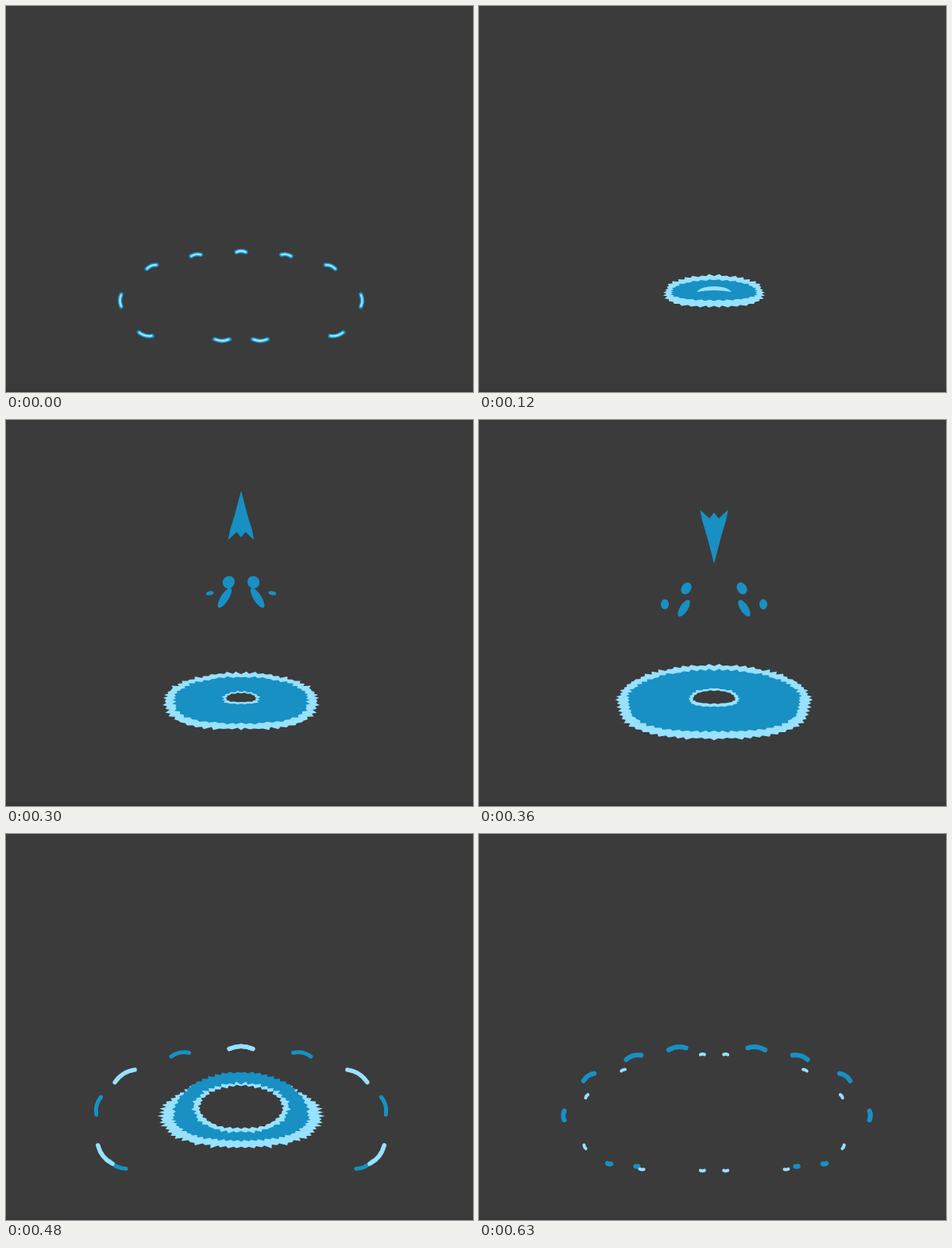
These frames come from a looping animation (588 px wide and 486 px high, 0.66 s). An HTML page:

```html
<!DOCTYPE html>
<html lang="en">
<head>
<meta charset="utf-8">
<title>Water splash</title>
<style>
html, body { margin: 0; width: 100%; height: 100%; overflow: hidden; background: #3b3b3b; }
svg { display: block; }
</style>
</head>
<body>
<svg width="588" height="486" viewBox="0 0 588 486">
  <defs>
    <clipPath id="crop"><rect width="588" height="426.5"/></clipPath>
    <filter id="soft" filterUnits="userSpaceOnUse" width="588" height="486" color-interpolation-filters="sRGB">
      <feGaussianBlur stdDeviation=".55"/>
    </filter>
  </defs>
  <rect width="588" height="486" fill="#3b3b3b"/>
  <rect y="482" width="588" height="4" fill="#373737"/>
  <g id="splash" clip-path="url(#crop)" filter="url(#soft)"></g>
</svg>
<script>
const CX = 296, STEP = 30, STEPS = 22;
const BG = '#3b3b3b', BLUE = '#1890c3', LIGHT = '#98e1ff';
const FILLS = [LIGHT, BLUE, LIGHT, BG];
const stage = document.getElementById('splash');

// Ring poses: squareness of the lower half, waviness of the rim,
// then layers of [radius, middle y, height above, height below].
const PUDDLE = [3, 0, [[61, 359, 20, 19], [53, 359, 14, 11]]];
const SEED = [3, 0, [[32, 350, 8, 10], [24, 350, 6, 7], [0, 350, 0, 0], [0, 350, 0, 0]]];
const DISC = [2.9, 0, [[120, 351, 42, 50], [108, 351, 36, 41], [31, 351, 13, 10], [26, 350, 9, 7]]];
const WIDE = [4, .035, [[162, 354, 68, 65], [154, 354, 66, 60], [137, 354, 50, 49], [95, 353, 34, 35]]];
const SECOND = [2, 0, [[128, 357, 60, 52], [110, 355, 73, 43], [84, 342, 43, 43], [74, 341, 37, 37]]];

const rad = deg => deg * Math.PI / 180;
const noise = k => Math.abs(Math.sin(k * 12.9898) * 43758.5453) % 1;
const mix = (a, b, t) => Array.isArray(a) ? a.map((v, i) => mix(v, b[i], t)) : a + (b - a) * t;
const grow = ([n, wave, layers], ...ks) => [n, wave, layers.map(([rx, cy, up, down], i) => {
  const k = ks[i] || ks[0];
  return [rx * k, cy, up * k, down * k];
})];

// Left side of an oval; turn runs from the top (0) to the bottom (PI).
function rim([rx, cy, up, down], n, turn, wave = 0) {
  const s = Math.abs(Math.sin(turn)), c = Math.cos(turn), p = c > 0 ? 2 : n;
  const r = (1 - wave * Math.cos(6 * turn)) / (s ** p + Math.abs(c) ** p) ** (1 / p);
  return [-rx * s * r, cy - (c > 0 ? up : down) * c * r];
}

function closed(half, fill) {
  const right = half.slice(1, -1).reverse().map(([x, y]) => [-x, y]);
  const d = half.concat(right).map(([x, y]) => (CX + x).toFixed(1) + ' ' + y.toFixed(1));
  return `<path d="M${d.join('L')}Z" fill="${fill}"/>`;
}

// Oval with irregular teeth that lean sideways, largest at the flanks.
function ragged(layer, n, wave, teeth, fill) {
  const count = Math.round((layer[0] + layer[2]) * .4) + 4, half = [];
  for (let i = 0; i <= count; i++) {
    const turn = Math.PI * i / count, [x, y] = rim(layer, n, turn, wave);
    const size = teeth * (i % 2 ? noise(i + layer[0]) : -.6 * noise(i + layer[2]));
    const lean = i % count ? size * (.3 + .7 * Math.sin(turn)) : 0;
    half.push([Math.min(0, x - lean), y - size * .5 * Math.cos(turn)]);
  }
  return closed(half, fill);
}

function ring([n, wave, layers], ...teeth) {
  return layers.map((layer, i) => ragged(layer, n, i ? 0 : wave, teeth[i] || teeth[0], FILLS[i])).join('');
}

function mirrored(s, axis = CX) {
  return s + `<g transform="translate(${2 * axis}) scale(-1 1)">${s}</g>`;
}

// Short curved strokes lying along an oval, at the given angles from its top.
function bits(oval, angles, fill, len, wide, axis = CX) {
  return mirrored(angles.map(deg => {
    const at = d => rim(oval, 4, rad(d)), [x, y] = at(deg);
    const a = at(deg + 1), b = at(deg - 1), tilt = Math.atan2(b[1] - a[1], b[0] - a[0]) / rad(1);
    const l = Math.max(1, (typeof len === 'function' ? len(deg) : len) - wide) / 2;
    return `<path transform="translate(${axis + x} ${y}) rotate(${deg ? tilt : 0})" ` +
      `d="M${-l} ${l * .15}Q0 ${-l * .3} ${l} ${l * .15}" fill="none" stroke="${fill}" ` +
      `stroke-width="${wide}" stroke-linecap="round"/>`;
  }).join(''), axis);
}

function blob(x, y, rx, ry, fill, turn = 0) {
  return `<ellipse transform="translate(${CX + x} ${y}) rotate(${turn})" rx="${rx}" ry="${ry}" fill="${fill}"/>`;
}

function crescent(w, top, drop, thick, fill) {
  const low = top + drop, inner = top + thick;
  return `<path transform="translate(${CX})" fill="${fill}" d="M${-w} ${low}Q${-w * .75} ${top} 0 ${top}` +
    `Q${w * .75} ${top} ${w} ${low}Q${w / 2} ${inner} 0 ${inner}Q${-w / 2} ${inner} ${-w} ${low}Z"/>`;
}

// Parabola through the values at steps 8, 12 and 14.
function arc(s, a, b, c) {
  return a * (s - 12) * (s - 14) / 24 - b * (s - 8) * (s - 14) / 8 + c * (s - 8) * (s - 12) / 12;
}

function droplets(s) {
  const t = (s - 12) / 2, k = s > 14 ? .6 : 1;
  const drop = (x, y, rx, ry, turn) => blob(x, y, rx * k, ry * k, BLUE, turn);
  return mirrored(
    drop(arc(s, -11, -35, -69), arc(s, 232, 212, 255), mix(6, 4.5, t), 8, 32) +
    drop(arc(s, -26, -38, -78), arc(s, 245, 237, 284), 5, mix(12, 9.5, t), 32) +
    drop(arc(s, -29, -62, -97), arc(s, 240, 232, 282), 5, mix(6.5, 10.5, t), mix(0, 15, t)));
}

function puddle(k) {
  return ring(grow(PUDDLE, k), 4, 3) + crescent(22 * k, 359 - 6 * k, 7 * k, 5 * k, LIGHT);
}

// Body of water widening downwards from half width w0.
function flare(top, w0, power) {
  const half = [[0, top]];
  for (let u = 0; u <= 1; u += .1) half.push([-w0 - (27 - w0) * u ** power, mix(top, 350, u)]);
  return closed([...half, [0, 352]], BLUE);
}

const foam = k => ragged([32 * k, 350, 8, 9], 2.5, 0, 5, LIGHT);

function jet(s) {
  const t = (s - 5) / 3;
  return (s < 7 ? puddle(1 - .25 * t) : '') + foam(1.5 - .5 * t) +
    flare(mix(312, 127, t), 0, 1.3 + t) + (s === 7 ? crown(34) : '');
}

function column(k) {
  const cap = 350 - 76 * k;
  return foam(1) + flare(cap + 6, 9, 2.2) + blob(0, cap - 1, 17, 9 * k, BLUE) +
    mirrored(blob(-17, cap + 1, 5.5, 5, LIGHT) + blob(-13, cap + 3, 6, 4, BLUE) +
      blob(-7, cap - 6 * k, 4.5, 3.5, LIGHT)) + (k === 1 ? ragged([29, 350, 5, 9], 2.5, 0, 4, LIGHT) : '');
}

function crown(dy = 0) {
  return crescent(29, 238 + dy, 24, 18, BLUE) + crescent(31, 249 + dy, 19, 10, LIGHT);
}

// Arrowhead with a three-toothed tail; it turns over at the top of its flight.
function tip(s) {
  const top = Math.max(89, arc(s, 127, 113, 241));
  const w = mix(15, 19, (s - 8) / 6), h = s < 12 ? mix(56, 68, (s - 8) / 4) : mix(68, 84, (s - 12) / 2);
  const shape = [[0, 0], [.3, .3], [.5, .5], [.85, .8], [1, 1], [.33, .84], [0, .95]];
  return closed(shape.map(([x, y]) => [-x * w, top + h * (s > 10 ? 1 - y : y)]), BLUE);
}

function firstRing(s) {
  if (s <= 12) return ring(mix(SEED, DISC, Math.sin(rad(22.5 * (s - 8)))), 5, 4, 3, 2);
  if (s <= 14) return ring(mix(DISC, WIDE, (s - 12) / 2), 7, 3, 4, 14);
  if (s === 15) return ring(grow(WIDE, 1.07, 1.08, 1.2, 1.5), 7, 3, 4, 8);
  const k = 18 - s, r = 1 - k * .025, oval = [192 * r, 352, 88 * r, 84 * r];
  return bits(oval, [25, 83, 134], BLUE, 8 + 10 * k, 3 + k) +
    bits(oval, [0, 54, 125], LIGHT, 11 + 12 * k, 3.5 + k);
}

function secondRing(s) {
  const start = mix(SEED, SECOND, 0);
  return s < 19
    ? ring(mix(start, SECOND, Math.sin(rad(22.5 * (s - 14)))), 6, 4, 5, 4)
    : ring(grow(SECOND, 1.2, 1.2, 1.46, 1.6), 6, 4, 5, 4);
}

function lastBits(s) {
  const r = 1 + s * .015, oval = [152 * r, 365, 56 * r, 56 * r], angles = [0, 22, 48, 96, 138, 171];
  const len = deg => (17 + deg / 24) * (1 - s * .45);
  return bits(oval, angles, BLUE, len, 5.5 - 2 * s) +
    bits(oval, angles, LIGHT, deg => len(deg) * .8, 2.5 - s);
}

function outerBits(s) {
  const k = 21 - s, r = 1 - k * .06;
  return bits([193 * r, 352, 86 * r, 68 * r], [15, 33, 57, 92, 143, 152], BLUE,
    deg => 30 * (1 - deg / 220) * (1 + k), 6 + 2 * k, 299.5) +
    bits([168 * r, 352, 75 * r, 72 * r], [5, 43, 73, 121, 151, 175], LIGHT, 9 + 10 * k, 4 + k);
}

function scene(s) {
  if (s < 2) return lastBits(s);
  if (s < 5) return puddle((s - 1) / 3);
  if (s < 8) return jet(s);
  if (s === 8) {
    return column(1) + crown() + tip(s) + bits([31, 264, 33, 0], [48], LIGHT, 10, 3.5) +
      `<g opacity=".6">${bits([31, 264, 33, 0], [20], LIGHT, 6, 3.5)}</g>`;
  }
  if (s < 15) return firstRing(s) + (s === 9 ? column(.6) : '') + droplets(s) + tip(s);
  if (s < 19) return firstRing(s) + secondRing(s) + (s === 15 ? droplets(s) : '');
  return s === 19 ? secondRing(s) : outerBits(s);
}

let start = null, shown = -1;
function tick(now) {
  if (start === null) start = now;
  const s = Math.floor(Math.max(0, now - start) / STEP + .001) % STEPS;
  if (s !== shown) stage.innerHTML = scene(shown = s);
  requestAnimationFrame(tick);
}
stage.innerHTML = scene(0);
requestAnimationFrame(tick);
</script>
</body>
</html>
```
